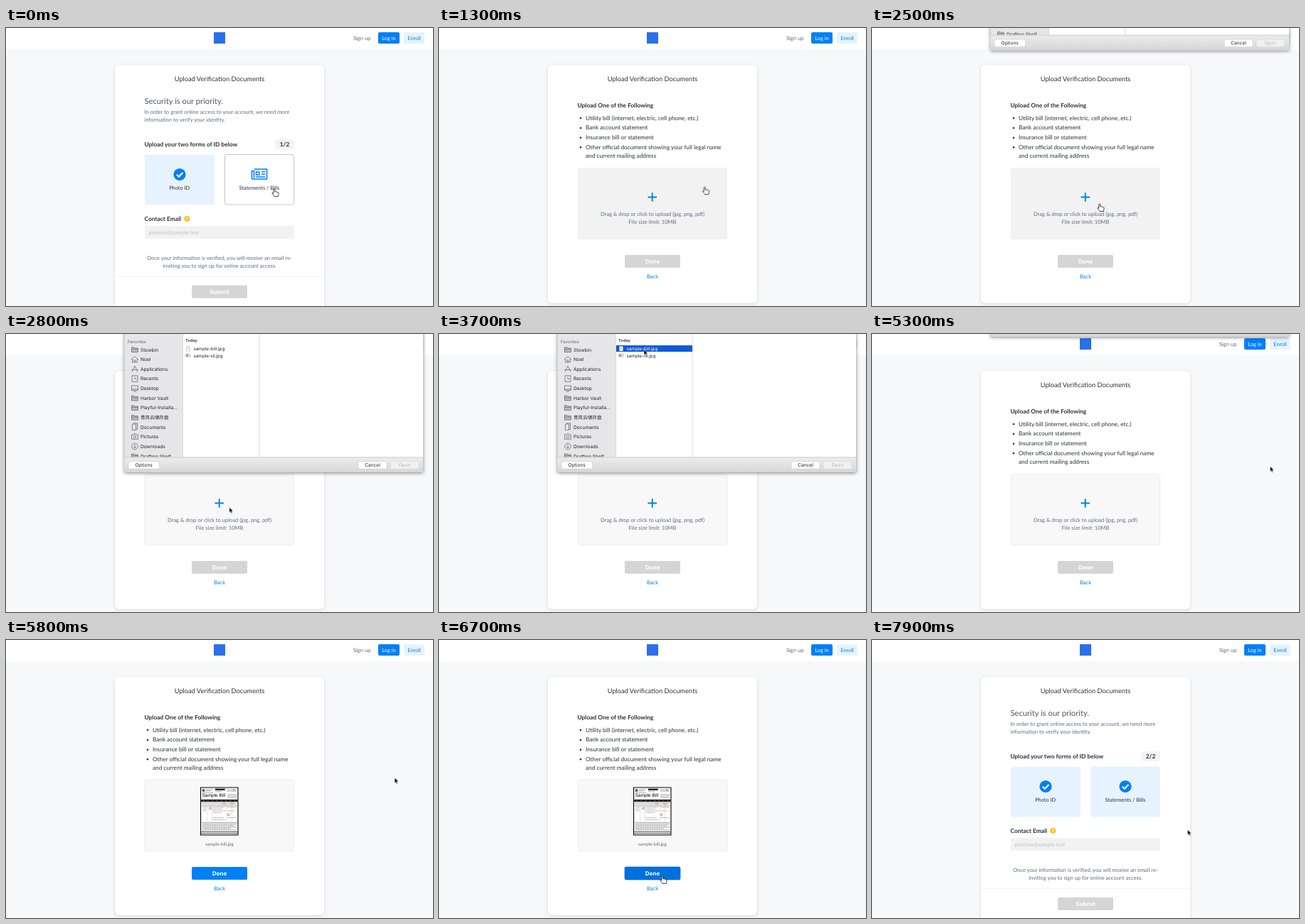
An HTML page that plays this animation: 600 px wide and 392 px high, repeating every 8 s.

```html
<!DOCTYPE html>
<html lang="en">
<head>
<meta charset="utf-8">
<title>Upload verification documents</title>
<style>
html, body { margin: 0; width: 100%; height: 100%; overflow: hidden; background: #f7f8fa; }
svg { display: block; width: 600px; height: 392px; }
text { font: 7.55px Lato, sans-serif; fill: #2d3036; text-rendering: geometricPrecision; }
.mid { text-anchor: middle; }
.title { font-size: 9.25px; }
.lead { font-size: 11.2px; fill: #4d5866; }
.soft { fill: #5c6b80; }
.bold { font-size: 8.4px; font-weight: 700; }
.item { font-size: 8.25px; }
.small { font-size: 7.4px; }
.link { fill: #0080e5; }
.hint { fill: #bfc1c5; }
.btn { font: 700 8px Inter, sans-serif; fill: #fff; }
.card { fill: #fff; filter: drop-shadow(0 1px 2px rgba(40, 50, 70, .16)); }
.blue { fill: #0080f6; }

/* file dialog */
.sheet text { font: 6.6px Inter, "Noto Sans CJK SC", "Noto Sans CJK", sans-serif; fill: #222; }
.sheet .head { font-size: 5.9px; font-weight: 500; fill: #777; }
.sheet .day { font-size: 5.6px; font-weight: 700; fill: #444; }
.sheet .file { font-size: 6.3px; }
.sheet .name { font-size: 7.9px; font-weight: 500; }
.sheet .kind { font-size: 6.5px; font-weight: 500; fill: #777; }
.sheet .meta { font-size: 6.2px; }
.sheet .grey { fill: #888; }
.sheet .pale { fill: #bbb; }
.sheet .white { fill: #fff; }
.push { fill: #fff; stroke: #cacaca; stroke-width: .6; }
.icons { fill: none; stroke: #6c6c70; stroke-width: .8; }
.bill text { font: 9.3px "Liberation Sans", Arial, sans-serif; fill: #000; }

/* timeline: 1% = 80 ms */
.form, .upload, .sheet, .cursor, .tick, .todo, .hover, .prompt, .loaded, .press,
.picked, .detail, .hand, .arrow { animation: 8s linear infinite; }
.form, .tick, .todo, .hover, .prompt, .loaded, .press, .picked, .detail, .hand, .arrow {
  animation-timing-function: step-end;
}
.form { animation-name: form; }
@keyframes form { 0% { opacity: 1 } 13.6% { opacity: 0 } 88.1%, to { opacity: 1 } }
.upload { animation-name: upload; }
@keyframes upload { 0%, 10.4% { opacity: 0 } 13.5%, 88.2% { opacity: 1 } 91%, to { opacity: 0 } }
.todo { animation-name: todo; }
@keyframes todo { 0% { opacity: 1 } 50%, to { opacity: 0 } }
.tick { animation-name: tick; }
@keyframes tick { 0% { opacity: 0 } 50%, to { opacity: 1 } }
.hover { animation-name: hover; }
@keyframes hover { 0% { opacity: 1 } 33%, to { opacity: 0 } }
.prompt { animation-name: prompt; }
@keyframes prompt { 0% { opacity: 1 } 68.4%, to { opacity: 0 } }
.loaded { animation-name: loaded; }
@keyframes loaded { 0% { opacity: 0 } 68.4%, to { opacity: 1 } }
.press { animation-name: press; }
@keyframes press { 0% { opacity: 0 } 82.1%, to { opacity: 1 } }
.picked { animation-name: picked; }
@keyframes picked { 0% { opacity: 0 } 45.8%, to { opacity: 1 } }
.detail { animation-name: detail; }
@keyframes detail { 0% { opacity: 0 } 49.5%, to { opacity: 1 } }
.hand { animation-name: hand; }
@keyframes hand { 0% { opacity: 1 } 32.2% { opacity: 0 } 82.1% { opacity: 1 } 89.5%, to { opacity: 0 } }
.arrow { animation-name: arrow; }
@keyframes arrow { 0% { opacity: 0 } 32.2% { opacity: 1 } 82.1% { opacity: 0 } 89.5%, to { opacity: 1 } }
.sheet { animation-name: sheet; }
@keyframes sheet {
  0%, 29.75% { transform: translateY(-204px); animation-timing-function: ease-in-out }
  34.66%, 62.75% { transform: none; animation-timing-function: ease-in-out }
  67.01%, to { transform: translateY(-204px) }
}
.cursor { animation-name: cursor; }
@keyframes cursor {
  0%, .2% { transform: translate(377px, 227px) }
  1.2%, 2.6% { transform: translate(347px, 206px) }
  5%, 15.2% { transform: translate(373px, 215px) }
  17.4%, 19% { transform: translate(374px, 234px) }
  21.2% { transform: translate(302px, 229px) }
  23.7%, 33% { transform: translate(320px, 248px); animation-timing-function: ease-in-out }
  38.7%, 39% { transform: translate(296px, 234px); animation-timing-function: ease-in-out }
  43.7%, 49% { transform: translate(288px, 22px); animation-timing-function: ease-in-out }
  56.2%, 70.5% { transform: translate(559.5px, 186.5px); animation-timing-function: ease-in-out }
  81.2% { transform: translate(373px, 293px) }
  83.6%, 91% { transform: translate(314px, 333px); animation-timing-function: ease-in-out }
  98.5%, to { transform: translate(443.5px, 267.5px) }
}
</style>
</head>
<body>
<svg viewBox="0 0 600 392">
  <defs>
    <g id="check">
      <circle r="8.6" class="blue"/>
      <path d="M-4.2 .3 -1.2 3.2 4.4-2.6" fill="none" stroke="#fff" stroke-width="2.2"/>
    </g>
    <g id="folder">
      <path d="M0 7.5V.8h3.4l1 1.2H9v5.5zM0 3.6h9" fill="#bcbcc0"/>
    </g>
    <g id="bill" class="bill">
      <path d="M.8.8h75.4v96.4H.8z" fill="#fff" stroke="#000" stroke-width="1.6"/>
      <path d="M4 4h5v5H4z" fill="#555"/>
      <path d="M30 3h20v3.500H30z" fill="#222"/>
      <path d="M11 5h15M11 7.500h11M4 11h22M55 5h18M55 8h18M30 9h14M55 15h19M55 18h19M55 21h19" stroke="#666" stroke-dasharray="2.5 .7"/>
      <text x="4" y="19.500">Sample Bill</text>
      <path d="M2 25h73v4.500H2z"/>
      <path d="M4 27.300h70" stroke="#ccc" stroke-width=".8" stroke-dasharray="6 3"/>
      <path d="M3 31.500h71M3 38h71M3 72h71" stroke="#444" stroke-width=".7"/>
      <path d="M14 38v34M23 38v34M53 38v34M64 38v34" stroke="#bbb" stroke-width=".6"/>
      <path d="M4 34.800h69M5 41h8M25 41h24M5 44.500h8M25 44.500h20M5 48h8M25 48h26M25 51.500h18M55 41h17M55 48h14M55 62h17M25 62h22M25 66h25" stroke="#888" stroke-dasharray="3 .8"/>
      <path d="M4 75h69M4 78h64M4 81h69M4 84h58M4 87h69" stroke="#666" stroke-dasharray="4 .7"/>
      <path d="M2 90.500h73M2 94h73" stroke="#222" stroke-width="1.2"/>
      <g fill="#f6dede" stroke="#b9515a" stroke-width=".8">
        <circle cx="48" cy="33" r="2.3"/><circle cx="64" cy="33" r="2.3"/>
        <circle cx="20" cy="43" r="2.3"/><circle cx="57" cy="56" r="2.3"/><circle cx="68" cy="6" r="1.8"/>
      </g>
    </g>
    <linearGradient id="foot" x2="0" y2="1"><stop stop-color="#ededee"/><stop offset="1" stop-color="#d6d6d7"/></linearGradient>
    <linearGradient id="go" x2="0" y2="1"><stop stop-color="#3c82f4"/><stop offset="1" stop-color="#0a50dc"/></linearGradient>
    <clipPath id="pane"><path d="M166-60h421V173.500H166z"/></clipPath>
  </defs>

  <path d="M0 0h600v392H0z" fill="#f7f8fa"/>
  <path d="M0 0h600v30H0z" fill="#fff"/>
  <path d="M292 6h16v16h-16z" fill="#2b6fea"/>
  <text x="488" y="17" class="soft">Sign up</text>
  <rect x="523" y="6" width="30" height="16" rx="2" class="blue"/>
  <text x="538" y="17" class="mid small" style="fill:#fff">Log in</text>
  <rect x="559" y="6" width="29" height="16" rx="2" fill="#e6f3ff"/>
  <text x="573.5" y="17" class="mid small link">Enroll</text>

  <g class="form">
    <rect x="153" y="52" width="294" height="360" rx="6" class="card"/>
    <text x="300" y="75.4" class="mid title">Upload Verification Documents</text>
    <text x="194.5" y="107" class="lead">Security is our priority.</text>
    <text x="194.5" y="121" class="soft">In order to grant online access to your account, we need more</text>
    <text x="194.5" y="132" class="soft">information to verify your identity.</text>
    <text x="194.5" y="167" class="bold">Upload your two forms of ID below</text>
    <rect x="378" y="157" width="27" height="14" rx="4" fill="#f3f3f4"/>

    <rect x="195" y="178.5" width="98" height="71" rx="3" fill="#e6f3ff"/>
    <use href="#check" x="244" y="206.5"/>
    <text x="243.7" y="228" class="mid small">Photo ID</text>

    <g class="todo">
      <text x="391.5" y="167" class="mid bold">1/2</text>
      <rect x="307.5" y="178.5" width="97" height="70.5" rx="2.5" fill="#fff" stroke="#c3c6cd"/>
      <g fill="none" stroke="#0080f6" stroke-width="1.6">
        <path d="M348.5 199h18v14h-19.2c-1.2 0-1.8-.8-1.8-1.8V201.5h3v10"/>
        <path d="M351.5 203h4.5v4h-4.5zM359 202.7h5M359 206h5M351 210h13" stroke-width="1.4"/>
      </g>
    </g>
    <g class="tick">
      <text x="391.5" y="167" class="mid bold">2/2</text>
      <rect x="307" y="178.5" width="98" height="71" rx="3" fill="#e6f3ff"/>
      <use href="#check" x="356" y="206.5"/>
    </g>
    <text x="356" y="228" class="mid small">Statements / Bills</text>

    <text x="194.5" y="272.3" class="bold">Contact Email</text>
    <circle cx="254.3" cy="269" r="4.1" fill="#fcc31a"/>
    <text x="254.3" y="271.6" class="mid bold" style="fill:#fff;font-size:7px">?</text>
    <rect x="195" y="279" width="210" height="18" rx="2" fill="#f2f2f3"/>
    <text x="200.5" y="291" class="hint">petelow@sample.test</text>
    <text x="300" y="327" class="mid soft">Once your information is verified, you will receive an email re-</text>
    <text x="300" y="338" class="mid soft">inviting you to sign up for online account access.</text>
    <path d="M153 350.5h294" stroke="#f3f4f6"/>
    <rect x="261" y="363" width="78" height="18" rx="2" fill="#d5d5d6"/>
    <text x="300" y="374.7" class="mid btn">Submit</text>
  </g>

  <g class="upload">
    <rect x="153" y="52" width="294" height="336" rx="6" class="card"/>
    <text x="300" y="75.4" class="mid title">Upload Verification Documents</text>
    <text x="194.5" y="111.5" class="bold">Upload One of the Following</text>
    <g fill="#2d3036">
      <circle cx="199" cy="127" r="1.3"/><circle cx="199" cy="141" r="1.3"/>
      <circle cx="199" cy="154.7" r="1.3"/><circle cx="199" cy="168.3" r="1.3"/>
    </g>
    <text x="206" y="129.6" class="item">Utility bill (internet, electric, cell phone, etc.)</text>
    <text x="206" y="143.4" class="item">Bank account statement</text>
    <text x="206" y="157.2" class="item">Insurance bill or statement</text>
    <text x="206" y="171" class="item">Other official document showing your full legal name</text>
    <text x="206" y="183.3" class="item">and current mailing address</text>

    <rect x="195.5" y="197.5" width="209" height="100" rx="2" fill="#f8f8f9" stroke="#ececee"/>
    <rect x="195" y="197" width="210" height="101" rx="2" fill="#f2f2f3" class="hover"/>
    <g class="prompt">
      <path d="M293.5 238.5H306M299.7 232.3v12.5" stroke="#0080e5" stroke-width="1.9"/>
      <text x="300" y="264.8" class="mid soft">Drag &amp; drop or click to upload (jpg, png, pdf)</text>
      <text x="300" y="275.6" class="mid soft">File size limit: 10MB</text>
    </g>
    <rect x="261" y="320" width="78" height="18" rx="2" fill="#d5d5d6"/>
    <g class="loaded">
      <use href="#bill" transform="translate(273 207.5) scale(.695)"/>
      <text x="300" y="290.2" class="mid soft" style="font-size:6.35px">sample-bill.jpg</text>
      <rect x="261" y="320" width="78" height="18" rx="2" class="blue"/>
    </g>
    <rect x="261" y="320" width="78" height="18" rx="2" fill="#0070de" stroke="#0064c8" stroke-width=".7" class="press"/>
    <text x="300" y="332.2" class="mid btn">Done</text>
    <text x="300" y="353.2" class="mid link">Back</text>
  </g>

  <g class="sheet">
    <path d="M166.500-60H586V195H166.500z" fill="#e6e6e8" style="filter:drop-shadow(0 1.5px 2.5px rgba(0,0,0,.5))"/>
    <g clip-path="url(#pane)">
      <path d="M248.5-60H586V174H248.5z" fill="#fff"/>
      <path d="M248.5-60V174M356-60V174" stroke="#d4d4d6" stroke-width=".8"/>

      <text x="171" y="12.5" class="head">Favorites</text>
      <text x="189" y="24.5">Stowbin</text>
      <text x="189" y="38.1">Noel</text>
      <text x="189" y="51.8">Applications</text>
      <text x="189" y="65.4">Recents</text>
      <text x="189" y="79.1">Desktop</text>
      <text x="189" y="92.7">Harbor Vault</text>
      <text x="189" y="106.4">Playful-Installa…</text>
      <text x="189" y="120">青岚云储存盘</text>
      <text x="189" y="133.7">Documents</text>
      <text x="189" y="147.3">Pictures</text>
      <text x="189" y="160.9">Downloads</text>
      <text x="189" y="174.6">Drafting Shelf</text>
      <g class="icons">
        <use href="#folder" x="176.5" y="18"/>
        <path d="M176 36l5-4.3 5 4.3M177.5 35v4.8h7V35M180 39.8v-3h2v3"/>
        <path d="M177 53.5l4-8.5 4 8.5M176 50.5h10"/>
        <path d="M177 58.8h8v8.5h-8zM181 60.5v3h2.5"/>
        <path d="M176.5 73h9v6.5h-9zM176.5 77.8h9M179 81h4"/>
        <use href="#folder" x="176.5" y="86.3"/>
        <use href="#folder" x="176.5" y="100"/>
        <use href="#folder" x="176.5" y="113.6"/>
        <path d="M177.5 127h5v8.5h-5zM179.5 127v-1.2h5v8.5h-2"/>
        <path d="M176.5 142h2.5l.8-1.3h2.5l.8 1.3h2.4v6.3h-9z"/>
        <circle cx="181" cy="145" r="1.8"/>
        <circle cx="181" cy="158.5" r="4.3"/>
        <path d="M181 155.8v5M179 159l2 2 2-2"/>
        <use href="#folder" x="176.5" y="168.2"/>
      </g>

      <text x="252" y="10.5" class="day">Today</text>
      <text x="263.5" y="23" class="file">sample-bill.jpg</text>
      <g class="picked">
        <path d="M249 16h107v9H249z" fill="#115ad6"/>
        <text x="263.5" y="23" class="file white">sample-bill.jpg</text>
      </g>
      <path d="M253.5 17.5h5V24h-5z" fill="#fff" stroke="#aaa" stroke-width=".5"/>
      <path d="M254.3 19.3h3.4M254.3 21h3.4" stroke="#999" stroke-width=".5"/>
      <text x="263.5" y="32.6" class="file">sample-id.jpg</text>
      <path d="M252.8 28h6v4.3h-6z" fill="#dfe4ee" stroke="#999" stroke-width=".5"/>
      <path d="M253.5 29h2v2.5h-2z" fill="#777"/>

      <g class="detail">
        <use href="#bill" x="432" y="13"/>
        <text x="471" y="134" class="mid name">sample-bill.jpg</text>
        <text x="471" y="144.8" class="mid kind">JPEG image - 27 KB</text>
        <text x="457" y="164" class="meta grey" text-anchor="end">Tags</text>
        <text x="461.5" y="164" class="meta pale">Add Tags…</text>
        <text x="457" y="173.5" class="meta grey" text-anchor="end">Created</text>
        <text x="461.5" y="173.5" class="meta">Today, 9:08 PM</text>
      </g>
    </g>
    <path d="M166.5 174H586v21H166.5z" fill="url(#foot)"/>
    <path d="M166.5 174H586" stroke="#c4c4c6" stroke-width=".8"/>
    <rect x="172" y="179.7" width="43.5" height="10.5" rx="2" class="push"/>
    <text x="193.7" y="187.4" class="mid">Options</text>
    <rect x="495" y="179.7" width="40" height="10.5" rx="2" class="push"/>
    <text x="515" y="187.4" class="mid">Cancel</text>
    <rect x="540" y="179.7" width="40" height="10.5" rx="2" fill="#f1f1f2" stroke="#d6d6d6" stroke-width=".6"/>
    <text x="560" y="187.4" class="mid pale">Open</text>
    <g class="detail">
      <rect x="540" y="179.5" width="40" height="10.8" rx="2" fill="url(#go)"/>
      <text x="560" y="187.4" class="mid white">Open</text>
    </g>
  </g>

  <g class="cursor">
    <path class="hand" d="M-1.2 1C-1.2-.3.8-.3.8 1V4C1.8 3.4 2.6 3.7 2.8 4.3 3.7 3.8 4.4 4.2 4.6 4.9 5.5 4.6 6 5 6 5.9V7.5C6 8.8 5.2 9.3 5.2 10.5H0C-.3 9.3-2 8-3 6.3-3.4 5.3-2.3 4.9-1.2 6.2z" fill="#fff" stroke="#111" stroke-width=".8"/>
    <path class="arrow" d="M0 0V7.4L1.7 5.9 2.9 8.7 4.2 8.1 3 5.4H5.3z" stroke="#fff" stroke-width=".5"/>
  </g>
</svg>
</body>
</html>
```
